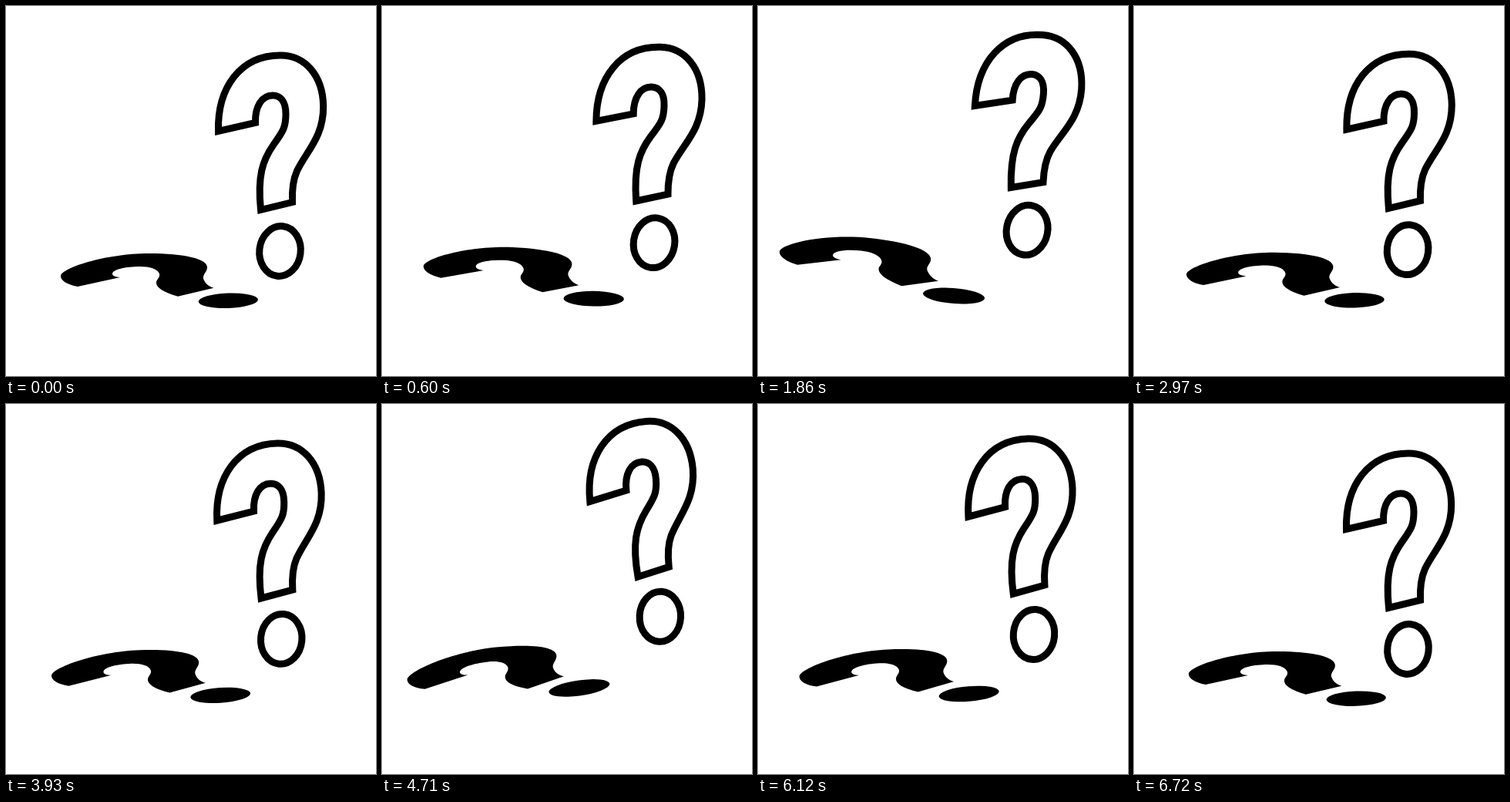
An HTML page that plays this animation: 480x480 px, repeating every 6750 ms.

```html
<!DOCTYPE html>
<html lang="en">
<head>
<meta charset="utf-8">
<title>Floating question mark</title>
<style>
html, body { margin: 0; width: 100%; height: 100%; overflow: hidden; background: #fff; }
svg { display: block; width: 100%; height: 100%; }
#mark { fill: #fff; stroke: #000; stroke-width: 9; stroke-miterlimit: 10; }
</style>
</head>
<body>
<svg viewBox="0 0 480 480">
  <g id="shadow">
    <path d="M93 364C79 361.5 71 356 71 350.5C71 340 130 321 185 321C232 321 261 328 261 339
      C261 346 253 349 257 356C259 360 263 364 269.5 365.7L223 376.7C204 371.5 194 365 195 358
      C196 354 200 352 199 347.5C197 341 186 338 174 338C155 338 138 342 138 347.5C138 350 142 351.5 148 352Z"/>
    <ellipse cx="288.3" cy="382.2" rx="38.7" ry="9.7" transform="rotate(-2 288 382)"/>
  </g>
  <g id="mark">
    <path d="M275.5 162.5C274 106 304 64 356 64C388 64 411 90 411.7 130C412 170 390 188 377.5 214
      C372 226 371 240 371.5 254.5L330.5 264.5C326 220 333 200 347 180C360 162 363 157 363 140
      C363 124 356 116 346 116C332 116 323 130 323.5 151.5Z"/>
    <ellipse cx="355.5" cy="318" rx="26.7" ry="32.5" transform="rotate(7 355.5 318)"/>
  </g>
</svg>
<script>
const LOOP = 6750, STEP = 30;
const mark = document.getElementById('mark');
const shadow = document.getElementById('shadow');

// Two swings away from rest: start, peak and end times, tilt, and the
// shadow's change as an affine matrix around its dot.
const swings = [
  { start: 0, peak: 1480, end: 3250, tilt: 5, warp: [.04, .123, .04, .045, -38.5, -7] },
  { start: 3250, peak: 5250, end: LOOP, tilt: -5, warp: [.026, -.124, .045, .045, -39, -16.5] }
];
const rest = [1, 0, 0, 1, 0, 0];
const ease = u => (1 - Math.cos(Math.PI * u)) / 2;

function draw(now) {
  const t = Math.floor(now % LOOP / STEP) * STEP;
  const { start, peak, end, tilt, warp } = swings.find(w => t < w.end);
  const s = ease(t < peak ? (t - start) / (peak - start) : (end - t) / (end - peak));
  const m = rest.map((v, i) => v + warp[i] * s);
  mark.setAttribute('transform', `translate(0 ${-40.5 * s}) rotate(${tilt * s} 240 240)`);
  shadow.setAttribute('transform', `translate(288 382) matrix(${m}) translate(-288 -382)`);
}

const begin = performance.now();
function tick() {
  draw(performance.now() - begin);
  requestAnimationFrame(tick);
}
tick();
</script>
</body>
</html>
```
